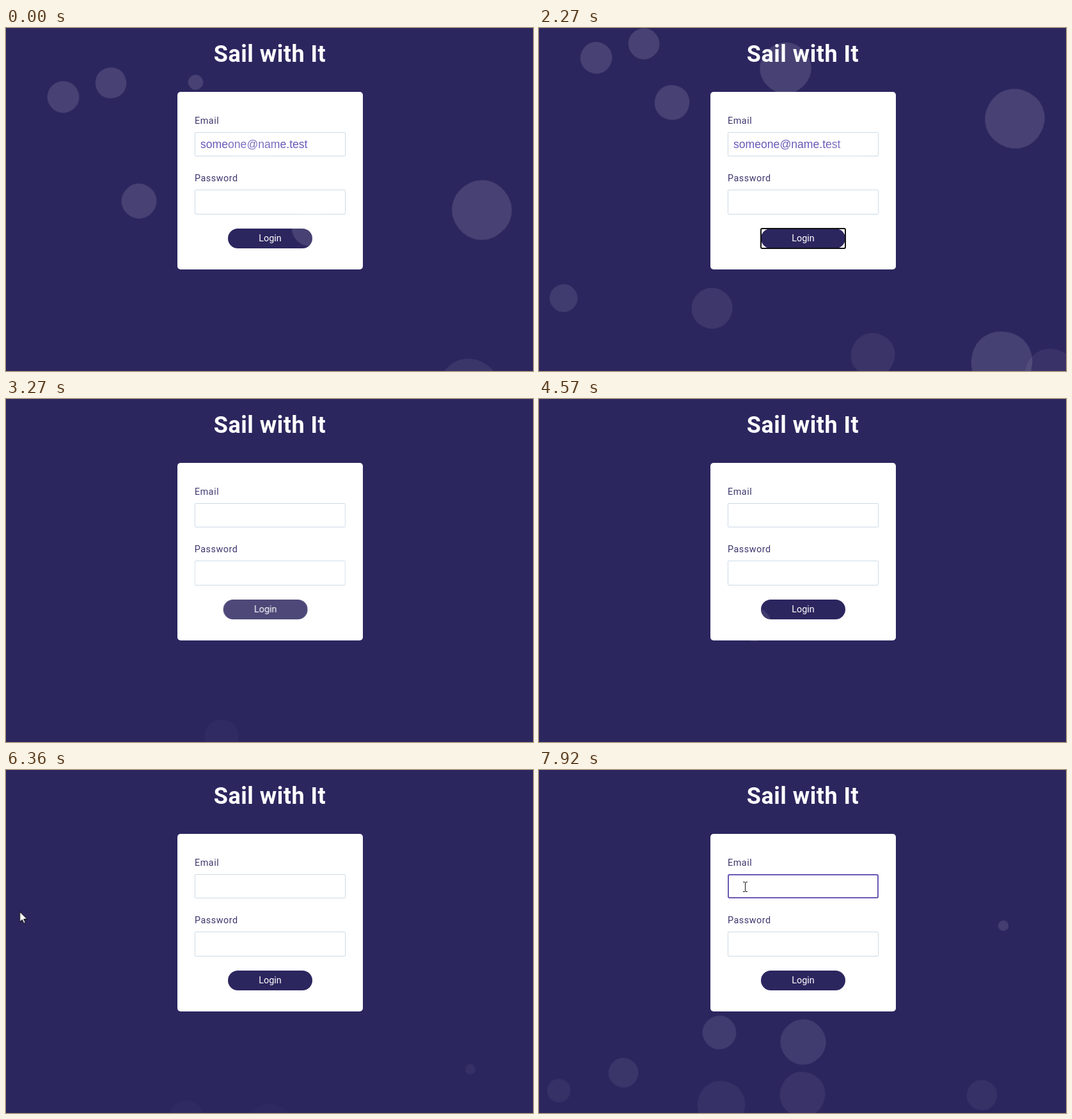
An HTML page that plays this animation: 824 px wide and 537 px high, repeating every 7.99 s.

```html
<!DOCTYPE html>
<html lang="en">
<head>
<meta charset="utf-8">
<title>Login</title>
<style>
* { box-sizing: border-box; }
html, body { margin: 0; width: 100%; height: 100%; overflow: hidden; background: #2c265f; }
body { position: relative; font-family: Roboto, sans-serif; letter-spacing: .5px; }
body * { position: absolute; }
h1 {
  left: 0; top: 20px; width: 825px; margin: 0; text-align: center;
  font-size: 36px; line-height: 42px; font-weight: 700; color: #fff;
}
#card {
  left: 268px; top: 100px; width: 290px; height: 278px;
  border-radius: 5px; background: #fff; overflow: hidden;
}
.block { left: 27px; width: 236px; height: 68px; }
.block label { left: 0; top: 1px; font-size: 14.4px; line-height: 18px; color: #3d376d; }
.field {
  left: 0; top: 27px; width: 236px; height: 38px;
  border: 1px solid #cddbe8; border-radius: 2px;
}
#value {
  left: 9px; top: 27px; line-height: 38px; letter-spacing: 0; white-space: nowrap;
  font-family: "Liberation Sans", Arial, sans-serif; font-size: 17.6px; color: #6a57b8;
}
#focus { border: 2px solid #6c58b4; border-radius: 3px; }
#caret { left: 9px; top: 36px; width: 1px; height: 20px; background: #6a57b8; }
#button {
  left: 79px; top: 214px; width: 132px; height: 31px; border-radius: 16px;
  background: #2c265f; color: #fff; text-align: center;
  font-size: 14.4px; line-height: 31px; letter-spacing: 0;
}
#ring { inset: -1px; border: 2px solid #101010; border-radius: 3px; }
.bubble { top: 0; background: #fff; border-radius: 48%; }
svg { left: 0; top: 0; overflow: visible; }
</style>
</head>
<body>
<h1>Sail with It</h1>
<div id="card">
  <div class="block" id="email" style="top:36px">
    <label>Email</label>
    <div class="field"></div>
    <div class="field" id="focus"></div>
    <div id="value">someone@name.test</div>
    <div id="caret"></div>
  </div>
  <div class="block" id="password" style="top:126px">
    <label>Password</label>
    <div class="field" style="height:39px"></div>
  </div>
  <div id="button">Login<div id="ring"></div></div>
</div>
<div id="bubbles"></div>
<svg id="arrow" width="12" height="19">
  <path d="M0 0V16L3.7 12.5L6.2 18.3L8.7 17.2L6.2 11.6H11.3Z" fill="#fff" stroke="#000"/>
</svg>
<svg id="beam" width="8" height="17">
  <path d="M0 .5H3M4 .5H7M3.5 1V15M0 15.5H3M4 15.5H7" fill="none" stroke="#111"/>
</svg>
<script>
const LOOP = 7990, RELOADS = [2780, 4780], FLOOR = 537;
const sheet = document.head.appendChild(document.createElement('style'));
const rules = [];
const at = ms => (ms / LOOP * 100).toFixed(3) + '%';

// Each step is [time in ms, declarations].
function animate(id, steps, easing = 'linear') {
  const frames = steps.map(([ms, css]) => `${at(ms)}{${css}}`).join('');
  rules.push(`@keyframes ${id}{${frames}}`,
    `#${id}{animation:${id} ${LOOP}ms ${easing} infinite}`);
}

function showBetween(id, from, to) {
  const steps = [[0, 'opacity:0'], [from, 'opacity:1']];
  if (to < LOOP) steps.push([to, 'opacity:0']);
  animate(id, [...steps, [LOOP, `opacity:${to < LOOP ? 0 : 1}`]], 'step-end');
}

// Replays an entrance after every page reload.
function enter(id, delay, duration, hidden) {
  const shown = 'opacity:1;transform:none';
  const steps = [[0, shown]];
  for (const start of RELOADS) {
    steps.push([start - 1, shown], [start, hidden],
      [start + delay, hidden], [start + delay + duration, shown]);
  }
  animate(id, [...steps, [LOOP, shown]], 'ease');
}

enter('card', 0, 200, 'opacity:0;transform:scale(.9)');
const aside = 'opacity:0;transform:translateX(-35%)';
enter('email', 20, 500, aside);
enter('password', 120, 400, aside);
enter('button', 220, 500, aside);

showBetween('value', 0, RELOADS[0]);
showBetween('ring', 2000, RELOADS[0]);
showBetween('focus', 7250, LOOP);
showBetween('caret', 7250, 7750);

const move = (x, y, alpha = 1) => `transform:translate(${x}px,${y}px);opacity:${alpha}`;
animate('arrow', [
  [0, move(-14, 226)], [5960, move(-14, 226)], [6360, move(21, 222)],
  [6750, move(238, 168)], [6920, move(296, 176)], [6925, move(296, 176, 0)],
  [LOOP, move(296, 176, 0)]
]);
animate('beam', [
  [0, move(296, 172, 0)], [6920, move(296, 172, 0)], [6925, move(296, 172)],
  [7150, move(319, 175)], [LOOP, move(319, 175)]
]);

// Rises steadily from below the floor, turning and brightening with age; y is its place at time `when`.
function addBubble(parent, id, when, end, x, radius, y, speed = 85) {
  const bottom = FLOOR + radius;
  const birth = when - (bottom - y) / speed * 1000;
  const pose = ms => {
    const age = Math.max(0, ms - birth) / 1000;
    const top = bottom - speed * age - radius;
    const alpha = .135 * (1 - Math.exp(-age / 1.2));
    return `transform:translateY(${top.toFixed(1)}px) rotate(${(age * 30).toFixed(1)}deg);opacity:${alpha.toFixed(3)}`;
  };

  const el = parent.appendChild(document.createElement('div'));
  el.id = id;
  el.className = 'bubble';
  el.style.cssText = `left:${x - radius}px;width:${2 * radius}px;height:${2 * radius}px`;

  const start = Math.max(0, birth), samples = 6;
  const steps = [[0, pose(0)]];
  for (let i = 0; i <= samples; i++) {
    const ms = start + (end - start) * i / samples;
    steps.push([ms, pose(ms)]);
  }
  animate(id, [...steps, [LOOP, pose(end)]]);
}

// Bubbles: x, radius, y at `when`, speed in px/s.
const pages = [
  { start: 0, end: RELOADS[0], when: 0, bubbles: [
    [89, 24.5, 108, 27], [164, 24, 86, 27], [296, 11.5, 85, 60],
    [208, 27, 271, 68], [743.5, 46, 285, 63], [723, 47.5, 566, 19],
    [385, 39.5, 174, 49], [475, 28, 313, 51], [38, 21.5, 600, 78],
    [270, 31.5, 700, 115], [521.5, 34, 671, 70], [800, 40, 656, 50]
  ] },
  { start: RELOADS[0], end: RELOADS[1], when: 4570, bubbles: [[337, 26, 353, 135]] },
  { start: RELOADS[1], end: LOOP, when: 7920, bubbles: [
    [725.5, 8, 244, 144], [413, 35, 426], [412, 35, 508], [281.5, 26, 411],
    [131.5, 23, 474], [31, 18, 502], [284.5, 37, 524], [692, 23.5, 509]
  ] }
];

pages.forEach(({ start, end, when, bubbles }, p) => {
  const group = document.getElementById('bubbles').appendChild(document.createElement('div'));
  group.id = 'page' + p;
  showBetween(group.id, start, end);
  bubbles.forEach((bubble, b) => addBubble(group, `bubble${p}-${b}`, when, end, ...bubble));
});
sheet.textContent = rules.join('\n');
</script>
</body>
</html>
```
